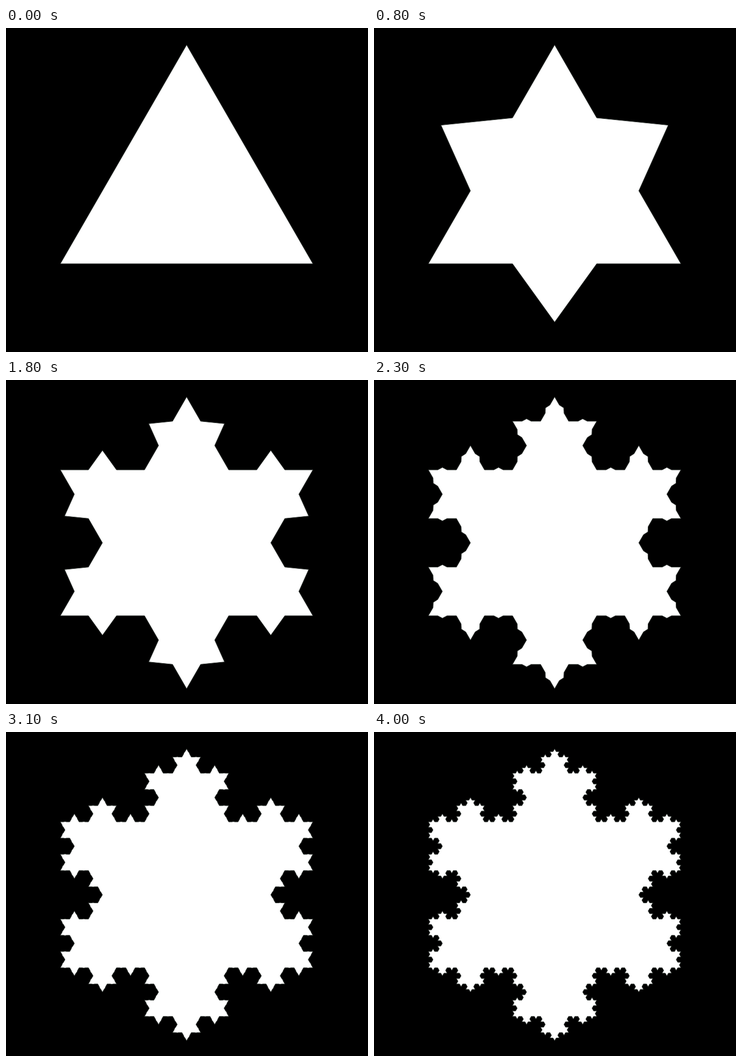
Write an HTML page that moves like this. It is 673 px wide and 602 px high and loops after 5.1 s.

```html
<!DOCTYPE html>
<html lang="en">
<head>
<meta charset="utf-8">
<title>Koch snowflake</title>
<style>
  html, body { margin: 0; width: 100%; height: 100%; overflow: hidden; background: #000; }
  svg { display: block; width: 673px; height: 602px; }
  path { fill: #fff; stroke: #3a403c; stroke-width: 1; stroke-linejoin: miter; }
</style>
</head>
<body>
<svg viewBox="0 0 673 602"><path id="flake"/></svg>
<script>
const LOOP = 5100, STEP = 100, STEPS_PER_LEVEL = 10, LEVELS = 4;
const CX = 335.8, CY = 302.5, RADIUS = 271;
const flake = document.getElementById('flake');

const corners = [-90, 30, 150].map(deg => {
  const a = deg * Math.PI / 180;
  return [CX + RADIUS * Math.cos(a), CY + RADIUS * Math.sin(a)];
});

// Raise a bump on the middle third of every side; grow = 1 is equilateral.
function subdivide(points, grow) {
  const h = grow * Math.sqrt(3) / 6;
  return points.flatMap(([x, y], i) => {
    const [nx, ny] = points[(i + 1) % points.length];
    const dx = nx - x, dy = ny - y;
    return [
      [x, y],
      [x + dx / 3, y + dy / 3],
      [x + dx / 2 + dy * h, y + dy / 2 - dx * h],
      [x + dx * 2 / 3, y + dy * 2 / 3]
    ];
  });
}

function outline(step) {
  let points = corners;
  for (let left = step; left > 0; left -= STEPS_PER_LEVEL) {
    points = subdivide(points, Math.min(1, left / STEPS_PER_LEVEL));
  }
  return 'M' + points.map(p => p.map(v => v.toFixed(2)).join(' ')).join('L') + 'Z';
}

const start = performance.now();
let shown = -1;

function draw() {
  const t = (performance.now() - start) % LOOP;
  const step = Math.min(LEVELS * STEPS_PER_LEVEL, Math.floor(t / STEP));
  if (step !== shown) {
    flake.setAttribute('d', outline(step));
    shown = step;
  }
  requestAnimationFrame(draw);
}
draw();
</script>
</body>
</html>
```
